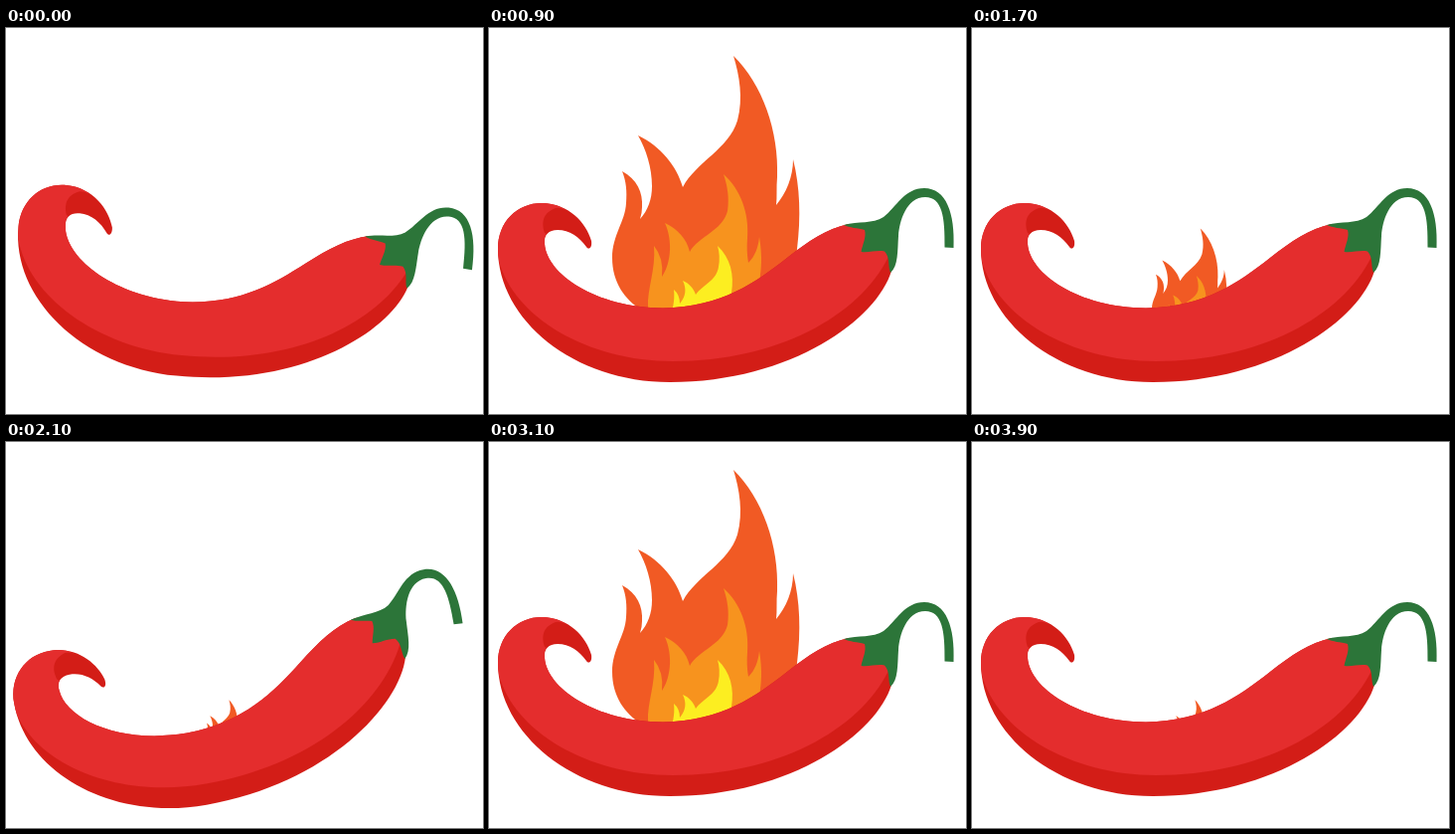
Write an HTML page that moves like this. It is 480 px wide and 388 px high and loops after 4 s.

```html
<!DOCTYPE html>
<html lang="en">
<head>
<meta charset="utf-8">
<title>Hot chili</title>
<style>
  html, body { margin: 0; width: 100%; height: 100%; overflow: hidden; background: #fff; }
  svg { display: block; width: 480px; height: 388px; }
</style>
</head>
<body>
<svg viewBox="0 0 480 388">
  <g id="flame">
    <path fill="#f15a24" d="M180 318 C170 305 161 292 153 283 C137 273 124 256 124 231 C124 208 137 195 138 176
      C139 164 138 154 134 144 C149 152 155 165 154 180 Q154 186 152 192 C160 183 164 172 164 159
      C164 140 158 122 150 108 C173 119 189 139 195 160 C209 134 241 122 250 93 C256 70 252 48 246 28
      C275 56 292 104 290 150 C289 160 290 170 289 178 C299 166 306 150 306 132 C313 160 314 190 310 222
      C306 260 290 290 270 318 Z"/>
    <path fill="#f7931e" d="M184 318 C170 308 161 295 160 281 C159 262 168 243 166 219 Q176 231 174 250
      C182 239 186 216 177 196 C190 202 199 212 202 225 C211 209 235 204 240 184 C242 171 240 159 236 147
      C253 162 262 186 260 211 Q259 225 261 236 C268 229 271 220 272 210 C275 228 275 244 270 264
      C264 288 252 305 240 318 Z"/>
    <path fill="#fcee21" d="M200 318 C190 306 185 294 185 281 Q187 271 186 263 Q192 268 192 277
      C198 270 199 262 195 254 C202 257 206 262 208 268 C215 258 229 254 231 240 Q233 229 230 219
      C243 231 247 248 244 266 C241 290 233 306 225 318 Z"/>
  </g>
  <g id="chili">
    <path fill="#d31d17" d="M98 220 C91 210 81 203 69 203 C60 203 55 208 56 217 C58 247 107 281 175 281.5
      C235 280 268 256 300 231 C322 214 339 202 362 197 L398 210 L405 244 C391 292 305 356 182 356
      C85 356 9 293 9 222 C9 195 28 176 53 176 C80 176 98 196 103 214 C104 222 100 223 98 220 Z"/>
    <path fill="#e42d2d" d="M56 206 C53 197 53 186 67 181 Q71 180 77 183 C70 178 62 176 53 176
      C28 176 9 195 9 222 Q9 228 10 234 C25 291 100 335 185 335 C290 335 372 290 402 230
      L398 210 L380 197 L362 197 C339 202 322 214 300 231 C268 256 235 280 175 281.5 C107 281 58 247 56 217
      Q55 210 58 207 Z"/>
    <path fill="#2c7539" d="M357 198 C372 194 386 197 397 190 C410 180 418 161 438 161 C460 161 469 186 467.5 221
      L458.5 220.5 C459 190 456 170 439 170 C420 170 413 194 412 209 C411 224 412 239 404 246
      C401 239 404 231 398 224.5 C390 223 383 226 374.5 225 C376 217 380 210 378 203 C371 201 363 201 357 198 Z"/>
  </g>
</svg>
<script>
  const flame = document.getElementById('flame');
  const chili = document.getElementById('chili');
  const STEP = 100;

  // Triangle wave: 0 at the ends of the period, half the period in the middle.
  const fold = (n, period) => Math.min(n % period, period - n % period);

  function draw(ms) {
    const n = Math.floor(ms % 4000 / STEP);
    const swing = fold(n, 8);
    const angle = 5 - 5 * swing + 0.6 * Math.max(0, 1 - swing);
    const scale = (fold(n, 20) + 1) / 10;
    chili.setAttribute('transform', `rotate(${angle} 242 247)`);
    flame.setAttribute('transform', `translate(219 317) scale(${scale}) translate(-219 -317)`);
  }

  const start = performance.now();
  function tick() {
    draw(performance.now() - start);
    requestAnimationFrame(tick);
  }
  tick();
</script>
</body>
</html>
```
